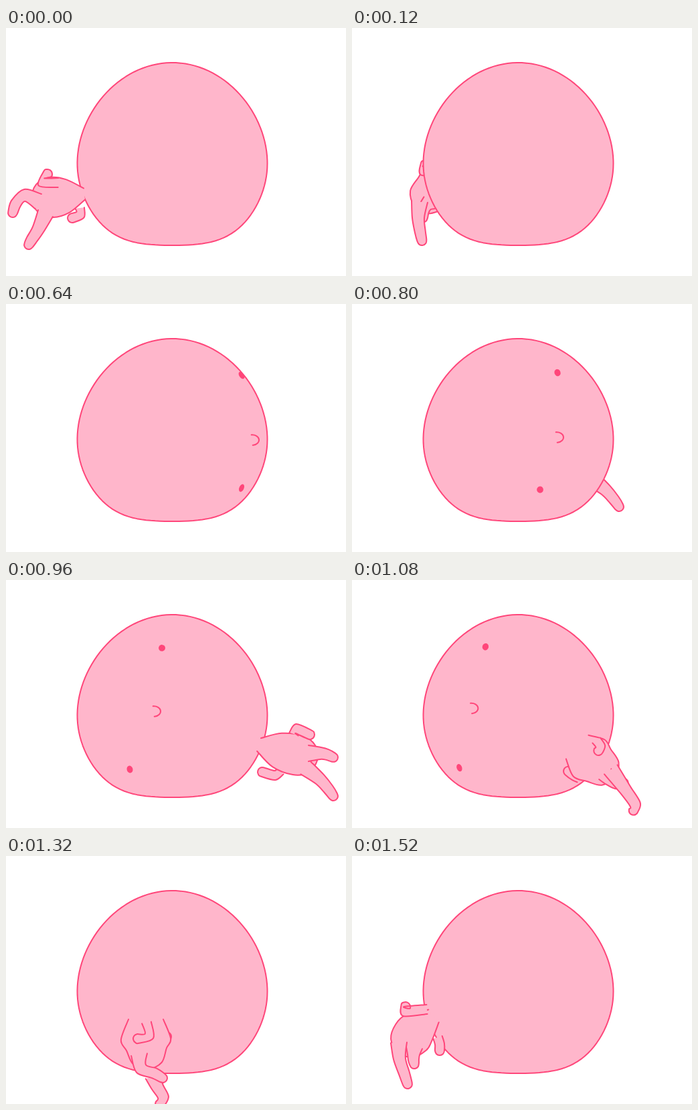
Animation, 508 px wide and 372 px high, one loop 1560 ms. Source, as an HTML page with a canvas:

```html
<!DOCTYPE html>
<html>
<head>
<meta charset="utf-8">
<style>
  html, body { margin: 0; overflow: hidden; background: #fff; }
  canvas { display: block; }
</style>
</head>
<body>
<canvas id="stage" width="508" height="372"></canvas>
<script>
const ctx = document.getElementById('stage').getContext('2d');
const LOOP = 1560, STEP = 40, CENTER = 248.5;
const FILL = '#ffb6cb', LINE = '#ff467a';
const ORDER = ['farArm', 'torso', 'farLeg', 'nearLeg', 'nearArm'];
const LEG = [12, 9, 8, 7], ARM = [7, 7, 7];

// Joints of each part, from its root to its tip.
const right = {
  torso: [378,247, 405,255, 436,263],
  farLeg: [452,260, 470,260, 480,262, 489,266],
  nearLeg: [448,282, 469,299, 482,314, 489,324],
  farArm: [410,286, 402,293, 383,288],
  nearArm: [430,231, 433,223, 454,232]
};
const frontRight = {
  torso: [309,253, 320,275, 324,288],
  farLeg: [329,312, 329,326, 338,334, 350,330],
  nearLeg: [346,286, 368,325, 384,352, 375,360],
  farArm: [292,304, 287,295, 283,286],
  nearArm: [322,247, 330,267, 311,272]
};
const front = {
  torso: [209,245, 209,275, 210,290],
  farLeg: [220,330, 226,346, 235,362, 230,372],
  nearLeg: [199,298, 202,319, 222,326, 234,333],
  farArm: [232,270, 236,271, 240,271],
  nearArm: [210,250, 214,270, 197,274]
};
const frontLeft = {
  torso: [122,240, 100,258, 88,272],
  farLeg: [93,288, 92,298, 92,306, 93,312],
  nearLeg: [70,280, 71,304, 78,326, 83,342],
  farArm: [128,272, 131,282, 131,292],
  nearArm: [112,230, 77,233, 80,226]
};
const left = {
  torso: [117,249, 92,252, 68,254],
  farLeg: [48,260, 28,251, 15,263, 10,277],
  nearLeg: [59,278, 48,302, 38,318, 34,325],
  farArm: [110,270, 111,280, 99,285],
  nearArm: [78,232, 53,231, 62,219]
};

const shift = (pose, dx, dy) => Object.fromEntries(Object.entries(pose).map(
  ([name, pts]) => [name, pts.map((v, i) => v + (i % 2 ? dy : dx))]));

const emerging = {
  ...shift(right, -90, -20),
  farLeg: [345,240, 350,240, 355,241, 360,242]
};

const BODY = [
  [0, left], [160, shift(frontLeft, 45, -25)], [320, shift(left, 130, -15)],
  [720, shift(emerging, -30, -25)], [800, emerging], [960, right],
  [1160, frontRight], [1320, front], [1520, frontLeft], [LOOP, left]
];

const FACE = [
  [640, { top: [352,107], mouth: [368,204], bottom: [352,276] }],
  [800, { top: [307,103], mouth: [306,200], bottom: [281,278.5] }],
  [960, { top: [233,102], mouth: [221,197], bottom: [185,284] }],
  [1160, { top: [177,99], mouth: [150,189.5], bottom: [144,280] }],
  [1280, { top: [138,96], mouth: [106,182], bottom: [112,276] }]
];

function poseAt(keys, t) {
  const i = Math.max(1, keys.findIndex(([time]) => time >= t));
  const [t0, a] = keys[i - 1], [t1, b] = keys[i];
  const k = (t - t0) / (t1 - t0);
  return Object.fromEntries(Object.keys(a).map(
    name => [name, a[name].map((v, j) => v + (b[name][j] - v) * k)]));
}

// Smooth open curve through the points.
function curve(pts) {
  const path = new Path2D();
  const at = i => pts[Math.min(pts.length - 1, Math.max(0, i))];
  path.moveTo(...pts[0]);
  for (let i = 0; i < pts.length - 1; i++) {
    const [p, q, r, s] = [at(i - 1), at(i), at(i + 1), at(i + 2)];
    path.bezierCurveTo(
      q[0] + (r[0] - p[0]) / 6, q[1] + (r[1] - p[1]) / 6,
      r[0] - (s[0] - q[0]) / 6, r[1] - (s[1] - q[1]) / 6, ...r);
  }
  return path;
}

// Outline around a chain of joints: round at the tip, open at the root.
function limb(joints, radii) {
  const last = radii.length - 1;
  const joint = i => joints.slice(2 * i, 2 * i + 2);
  const around = (i, turn) => {
    const [ax, ay] = joint(Math.max(0, i - 1)), [bx, by] = joint(Math.min(last, i + 1));
    const angle = Math.atan2(by - ay, bx - ax) + turn, [x, y] = joint(i);
    return [x + radii[i] * Math.cos(angle), y + radii[i] * Math.sin(angle)];
  };
  const side = turn => radii.map((_, i) => around(i, turn));
  const tip = [-Math.PI / 4, 0, Math.PI / 4].map(turn => around(last, turn));
  return curve([...side(-Math.PI / 2), ...tip, ...side(Math.PI / 2).reverse()]);
}

// A circle that sags and bulges towards the bottom.
function headOutline() {
  const path = new Path2D();
  for (let a = 0; a < 2 * Math.PI; a += 0.05) {
    const c = Math.cos(a), s = Math.sin(a);
    const sag = c * c * (14 + 36 * Math.max(0, s) ** 3);
    path.lineTo(CENTER + 142 * c, 189 + 137 * s + sag);
  }
  path.closePath();
  return path;
}

function paint(path) {
  ctx.fillStyle = FILL;
  ctx.fill(path);
  ctx.stroke(path);
}

const head = headOutline();

function drawEye([x, y], lean) {
  const u = (x - CENTER) / 120;
  ctx.fillStyle = LINE;
  ctx.beginPath();
  ctx.ellipse(x, y, 5 - 2 * u * u, 4.7 + 1.5 * Math.abs(u), lean * u, 0, 2 * Math.PI);
  ctx.fill();
}

function drawFace(t) {
  const { top, mouth, bottom } = poseAt(FACE, t);
  ctx.save();
  ctx.clip(head);
  drawEye(top, -0.7);
  drawEye(bottom, 0.5);
  ctx.beginPath();
  ctx.ellipse(...mouth, 10, 7.7, 0, -1.7, 1.5);
  ctx.stroke();
  ctx.restore();
}

function drawPart(name, joints) {
  // The neck narrows towards the sides of the head.
  const neck = 26 - 17 * Math.abs((joints[0] - CENTER) / 131) ** 6;
  const radii = name === 'torso' ? [neck, 19 + 0.7 * neck, 30] : name.endsWith('Leg') ? LEG : ARM;
  paint(limb(joints, radii));
}

function draw(t) {
  ctx.fillStyle = '#fff';
  ctx.fillRect(0, 0, 508, 372);
  ctx.strokeStyle = LINE;
  ctx.lineWidth = 2;
  ctx.lineCap = ctx.lineJoin = 'round';

  const pose = poseAt(BODY, t);
  const drawBody = () => ORDER.forEach(name => drawPart(name, pose[name]));
  const hidden = t >= 320 && t < 720, behind = t > 0 && t < 960;

  if (behind && !hidden) drawBody();
  paint(head);
  if (t >= 640 && t <= 1280) drawFace(t);
  if (!behind) drawBody();
}

function tick() {
  draw(Math.floor(performance.now() % LOOP / STEP) * STEP);
  requestAnimationFrame(tick);
}
tick();
</script>
</body>
</html>
```
